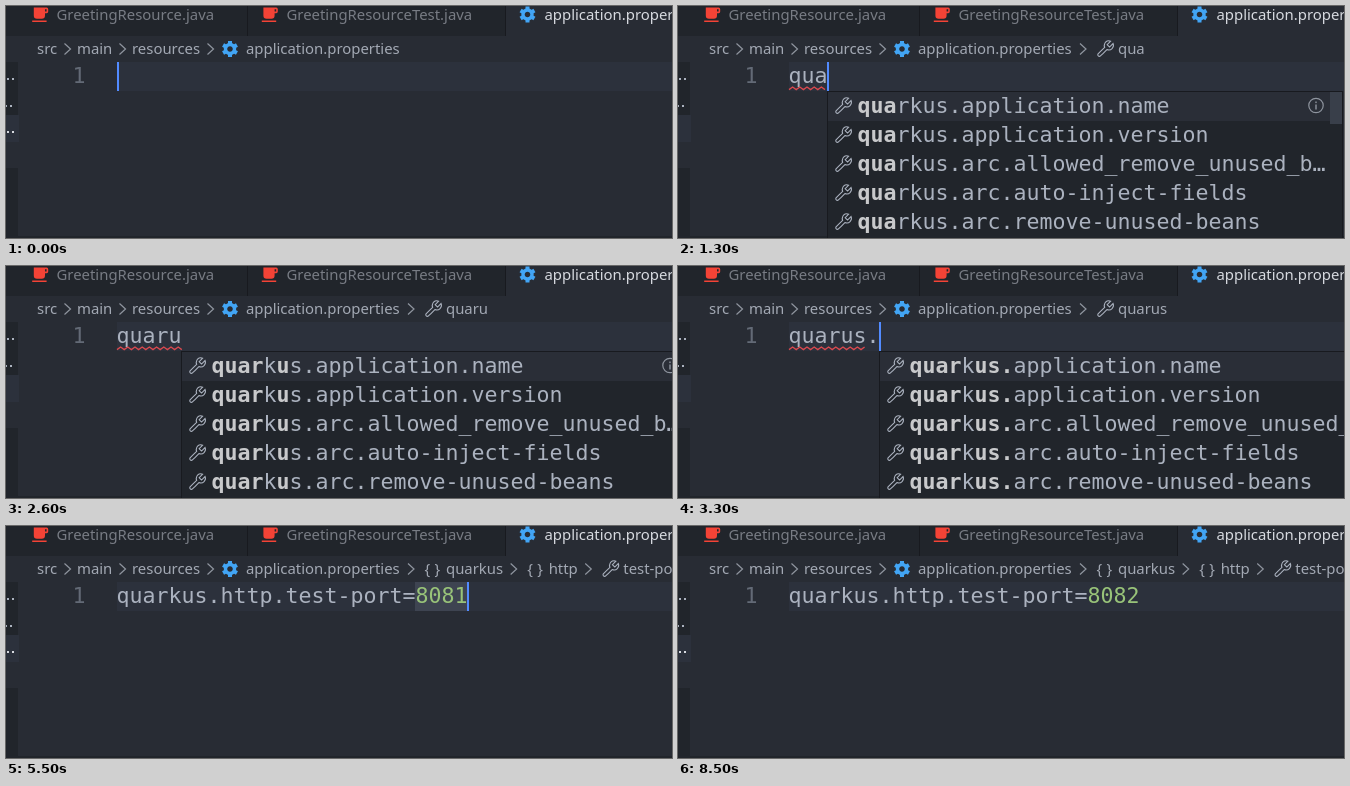
These frames come from a looping animation (666 by 232 pixels, 8600 ms). An HTML page with a canvas:

```html
<!DOCTYPE html>
<html lang="en">
<head>
<meta charset="utf-8">
<title>Property completion</title>
<style>
html, body { margin: 0; width: 100%; height: 100%; overflow: hidden; background: #282c34; }
canvas { display: block; }
</style>
</head>
<body>
<canvas id="stage" width="666" height="232"></canvas>
<script>
const ctx = document.getElementById('stage').getContext('2d');
const LOOP = 8600;
const MONO = '21.6px "DejaVu Sans Mono", monospace';
const UI = '14.9px "Noto Sans", sans-serif';
const CODE_X = 110.5, CHAR = 13, ROW = 29;
const DARK = '#21252b', BASE = '#282c34', LINE = '#2c313c', EDGE = '#181a1f', TEXT = '#abb2bf';
const KEY = 'quarkus.http.test-port=';

// Each track is a list of [start time, value].
const typed = [
  [0, ''], [400, 'q'], [700, 'qu'], [1100, 'qua'], [1800, 'quar'], [2100, 'quaru'],
  [2900, 'quarus'], [3300, 'quarus.'], [3600, 'quarus.t'], [3700, 'quarus.te'],
  [4600, KEY + '8081'], [6500, KEY + '8'], [6600, KEY + '80'], [6800, KEY + '808'], [7100, KEY + '8082']
];
const crumbs = [
  [0, []], [1300, ['qua']], [2400, ['quaru']], [3100, ['quarus']],
  [4100, ['quarus', 'te']], [4900, ['{}quarkus', '{}http', 'test-port']]
];
const squiggle = [
  [0, 0], [400, 1], [900, 2], [1100, 3], [1800, 4], [2100, 5],
  [2900, 6], [3400, 7], [3600, 8], [3700, 9], [4600, 0]
];
const caret = [
  [0, 1], [2600, 0], [2900, 1], [4100, 0], [4600, 1], [5000, 0],
  [5500, 1], [6100, 0], [6500, 1], [7500, 0], [8000, 1], [8500, 0]
];
const suggestions = [
  [400, ['application.name', 'application.version', 'arc.allowed_remove_unused_b…',
    'arc.auto-inject-fields', 'arc.remove-unused-beans']],
  [3600, ['http.test-port', 'http.test-ssl-port', 'thread-pool.core-threads',
    'thread-pool.growth-resistance', 'thread-pool.keep-alive-time']]
];

const at = (track, t) => track.filter(([start]) => start <= t).pop()[1];
const caretX = code => Math.round(109.6 + code.length * CHAR);

const wrenchPath = new Path2D('M2.8 14.5a1.3 1.3 0 0 1-.9-.4 1.3 1.3 0 0 1-.2-1.7C2.9 11.1 5.3 8.7 7.2 6.9' +
  'a3.8 3.8 0 0 1 0-3 3.7 3.7 0 0 1 5-2.1L9.3 4.7l2 2 2.9-2.9a3.8 3.8 0 0 1-.8 4.2' +
  ' 3.8 3.8 0 0 1-4.3.8C7.9 10 5.2 12.7 3.7 14.1a1.3 1.3 0 0 1-.9.4z');
const cupPath = new Path2D('M2 21H20V19H2ZM20 8H18V5H20ZM20 3H4V13A4 4 0 0 0 8 17H14A4 4 0 0 0 18 13V10H20A2 2 0 0 0 22 8V5A2 2 0 0 0 20 3Z');

function rect(x, y, w, h, color) {
  ctx.fillStyle = color;
  ctx.fillRect(x, y, w, h);
}

function text(str, x, y, color, font = UI) {
  ctx.font = font;
  ctx.fillStyle = color;
  ctx.fillText(str, x, y);
}

function polyline(points, color, width) {
  ctx.strokeStyle = color;
  ctx.lineWidth = width;
  ctx.beginPath();
  points.forEach(([x, y]) => ctx.lineTo(x, y));
  ctx.stroke();
}

function placed(x, y, scale, draw) {
  ctx.save();
  ctx.translate(x, y);
  ctx.scale(scale, scale);
  draw();
  ctx.restore();
}

function cup(x) {
  placed(x, -0.8, 0.8, () => {
    ctx.fillStyle = '#f44336';
    ctx.fill(cupPath, 'evenodd');
  });
}

function gear(x, y) {
  placed(x, y, 1, () => {
    ctx.strokeStyle = '#42a5f5';
    ctx.lineWidth = 3.4;
    ctx.beginPath();
    ctx.arc(0, 0, 4.5, 0, Math.PI * 2);
    ctx.stroke();
    for (let i = 0; i < 6; i++) {
      rect(-2, -8, 4, 3, '#42a5f5');
      ctx.rotate(Math.PI / 3);
    }
  });
}

function wrench(x, y) {
  placed(x, y, 1.2, () => {
    ctx.strokeStyle = TEXT;
    ctx.lineWidth = 0.9;
    ctx.stroke(wrenchPath);
  });
}

const chevron = x => polyline([[x - 3, 37.5], [x + 3, 43], [x - 3, 48.5]], '#8f959f', 1.2);

function drawTabs() {
  rect(0, 0, 499, 30, DARK);
  rect(241, 0, 1, 30, EDGE);
  rect(499, 0, 1, 30, EDGE);
  cup(24.6);
  text('GreetingResource.java', 50.5, 14, '#787c84');
  cup(254.2);
  text('GreetingResourceTest.java', 280.5, 14, '#787c84');
  gear(521.5, 8.5);
  text('application.properties', 538.5, 14, '#d7dae0');
}

function drawCrumbs(items) {
  const color = '#a3a9b4';
  text('src', 31, 48, color);
  chevron(61.5);
  text('main', 71, 48, color);
  chevron(116.5);
  text('resources', 126, 48, color);
  chevron(204.5);
  gear(224, 43);
  text('application.properties', 240, 48, color);
  let x = 394.5;
  for (const item of items) {
    const label = item.replace('{}', '');
    chevron(x + 10.5);
    if (label === item) {
      wrench(x + 23.5, 33);
    } else {
      text('{', x + 24, 48, color);
      text('}', x + 34, 48, color);
    }
    text(label, x + 45.5, 48, color);
    x += 45.5 + ctx.measureText(label).width;
  }
}

function drawSidebar(t) {
  rect(0, 56, 12, 176, DARK);
  rect(0, 136, 12, 26, BASE);
  rect(0, 109, 13, 27, LINE);
  const dots = (x, y, color) => [x, x + 5].forEach(left => rect(left, y, 2, 2, color));
  dots(1, 72, TEXT);
  dots(-1, 99, TEXT);
  if (t < 700 || t >= 4600) dots(1, 125, '#d7dae0');
}

function drawEditor(t, code) {
  rect(111, 56, 555, ROW, LINE);
  text('1', 66.5, 77, '#636a76', MONO);
  if (t >= 4600 && t < 6500) rect(409, 56, 53, ROW, '#3e4451');
  text(code.slice(0, KEY.length), CODE_X, 77, TEXT, MONO);
  text(code.slice(KEY.length), CODE_X + KEY.length * CHAR, 77, '#98c379', MONO);

  const length = at(squiggle, t) * CHAR;
  const wave = [];
  for (let x = 0; x <= length; x += 3.6) wave.push([111 + x, wave.length % 2 ? 81 : 83.6]);
  if (length) polyline(wave, '#d9494f', 1.3);
  if (at(caret, t)) rect(caretX(code) + (code ? 0 : 1), 56, 2, ROW, '#528bff');
}

// Indexes of the letters that match the input: adjacent letters first, then unbroken runs.
function matches(label, input) {
  const found = new Set();
  let from = 0;
  for (let i = 0; i < input.length; i++) {
    const run = label.indexOf(input.slice(i), from);
    const adjacent = label[from] === input[i];
    const hit = adjacent || run < 0 ? label.indexOf(input[i], from) : run;
    if (hit < 0) break;
    found.add(hit);
    from = hit + 1;
  }
  return found;
}

function drawPopup(t, input) {
  const left = caretX(input), width = 516;
  rect(left, 85, width, 147, EDGE);
  rect(left + 1, 86, width - 2, 146, DARK);
  rect(left + 1, 86, width - 2, ROW, '#2a2e37');
  rect(left + width - 13, 86, 12, 32, '#393f4a');

  at(suggestions, t).forEach((name, row) => {
    const label = 'quarkus.' + name, bold = matches(label, input);
    wrench(left + 7, 90 + row * ROW);
    [...label].forEach((letter, i) => text(letter, left + 30.5 + i * CHAR, 107 + row * ROW,
      bold.has(i) ? '#c8c9cb' : TEXT, (bold.has(i) ? 'bold ' : '') + MONO));
  });

  const infoX = left + width - 27;
  ctx.strokeStyle = '#8f959f';
  ctx.lineWidth = 1.2;
  ctx.beginPath();
  ctx.arc(infoX, 99.5, 7.2, 0, Math.PI * 2);
  ctx.stroke();
  rect(infoX - 0.7, 95.5, 1.4, 1.6, '#8f959f');
  rect(infoX - 0.7, 98.5, 1.4, 5, '#8f959f');
}

function render(now) {
  const t = now % LOOP, code = at(typed, t);
  rect(0, 0, 666, 232, BASE);
  drawTabs();
  drawCrumbs(at(crumbs, t));
  drawSidebar(t);
  drawEditor(t, code);
  rect(0, 230, 666, 2, DARK);
  if (t >= 400 && t < 4600) drawPopup(t, code);
}

const start = performance.now();
function tick() {
  render(performance.now() - start);
  requestAnimationFrame(tick);
}
tick();
</script>
</body>
</html>
```
